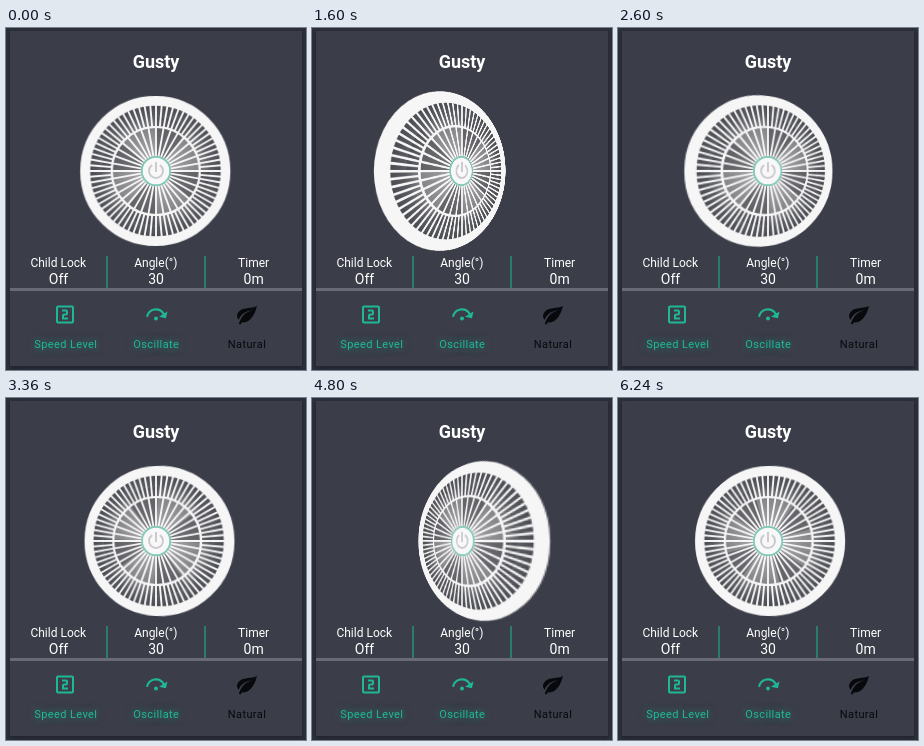
Recreate the animation shown at these times as an HTML page. Size 300 px wide and 342 px high, loop 6280 ms.

```html
<!DOCTYPE html>
<html lang="en">
<head>
<meta charset="utf-8">
<title>Fan control</title>
<style>
  html, body { margin: 0; width: 100%; height: 100%; overflow: hidden; background: #2d303b; }
  #stage { position: relative; width: 300px; height: 342px; overflow: hidden; }
  #card { position: absolute; left: 4px; top: 3px; width: 292px; height: 335px; background: #3b3d48; box-shadow: 0 2px 4px #20232d; }
  #panel, #fan { position: absolute; display: block; }
  #panel { left: 0; top: 0; }
  #view { position: absolute; left: 70px; top: 62.5px; width: 160px; height: 160px; perspective: 140px; }
  #fan { left: 0; top: 0; width: 160px; height: 160px; }
  text { font-family: Roboto, "Open Sans", sans-serif; text-anchor: middle; fill: #fff; }
  .title { font-size: 18px; font-weight: 700; }
  .label { font-size: 12px; }
  .value { font-size: 14px; }
  .mode { font-size: 11px; letter-spacing: .4px; }
  .on { fill: #1fb897; }
  .off { fill: #07090d; }
  text.on { text-shadow: 0 0 8px #1fb897b0; }
</style>
</head>
<body>
<div id="stage">
  <div id="card"></div>
  <svg id="panel" width="300" height="342" viewBox="0 0 300 342">
    <text class="title" x="150" y="40">Gusty</text>
    <text class="label" x="52.3" y="239">Child Lock</text>
    <text class="value" x="52.5" y="255.5">Off</text>
    <text class="label" x="149.8" y="239">Angle(°)</text>
    <text class="value" x="150" y="255.5">30</text>
    <text class="label" x="247.6" y="239">Timer</text>
    <text class="value" x="247.6" y="255.5">0m</text>
    <path class="on" d="M100.5 228h1v32h-1zM198.5 228h1v32h-1z"/>
    <rect x="4" y="260" width="292" height="3" fill="#696b74"/>
    <g class="on" transform="translate(47 274.5)">
      <rect x="4" y="4" width="16" height="16" rx="1" fill="none" stroke="#1fb897" stroke-width="2"/>
      <path d="M15 15h-4v-2h2a2 2 0 0 0 2-2V9a2 2 0 0 0-2-2H9v2h4v2h-2a2 2 0 0 0-2 2v4h6z"/>
    </g>
    <g class="on" transform="translate(138 274.5)">
      <circle cx="12" cy="16" r="2"/>
      <path d="M23.5 8.9L21.9 15.8L15 14.2L18.8 11.8A8 8 0 0 0 4.1 14.6L2.1 14.3A10 10 0 0 1 20.5 10.7Z"/>
    </g>
    <path class="off" transform="translate(229 274.5)" d="M17 8C8 10 5.9 16.2 3.8 21.3L5.7 22L6.7 19.7C7.1 19.9 7.6 20 8 20C19 20 22 3 22 3C21 5 14 5.25 9 6.25C4 7.25 2 11.5 2 13.5S3.75 17.25 3.75 17.25C7 8 17 8 17 8Z"/>
    <text class="mode on" x="59.8" y="320">Speed Level</text>
    <text class="mode on" x="150.3" y="320">Oscillate</text>
    <text class="mode off" x="241" y="320">Natural</text>
  </svg>
  <div id="view">
    <svg id="fan" viewBox="-80 -80 160 160">
      <defs>
        <radialGradient id="depth" gradientUnits="userSpaceOnUse" cx="0" cy="0" r="66">
          <stop offset=".25" stop-color="#a2a2a5"/>
          <stop offset=".65" stop-color="#858589"/>
          <stop offset=".82" stop-color="#5c5d62"/>
          <stop offset="1" stop-color="#4a4b51"/>
        </radialGradient>
      </defs>
      <circle r="66" fill="url(#depth)"/>
      <g id="blades" fill="#3d3e44" opacity=".5"></g>
      <path id="grille" fill="none" stroke="#f6f6f7" stroke-width="1.9"/>
      <circle r="44" fill="none" stroke="#f6f6f7" stroke-width="2.2"/>
      <circle r="70.2" fill="none" stroke="#f6f6f7" stroke-width="9.8"/>
      <circle r="14.2" fill="#f8f8f9" stroke="#7fc8b7" stroke-width="1.8"/>
      <path fill="none" stroke="#cbcbce" stroke-width="2" d="M-3.8 -5.9A7 7 0 1 0 3.8 -5.9M0 -9V1"/>
    </svg>
  </div>
</div>
<script>
  const LOOP = 6280, STEP = 40, SWING = 40;
  const fan = document.getElementById('fan');
  const blades = document.getElementById('blades');

  const polar = (radius, degrees) => {
    const a = degrees * Math.PI / 180;
    return `${(radius * Math.cos(a)).toFixed(2)} ${(radius * Math.sin(a)).toFixed(2)}`;
  };

  const spokes = (count, inner, outer) => Array.from({ length: count }, (_, i) => {
    const a = i * 360 / count;
    return `M${polar(inner, a)}L${polar(outer, a)}`;
  }).join('');

  document.getElementById('grille').setAttribute('d', spokes(36, 14, 44) + spokes(72, 44, 66));
  blades.innerHTML = [0, 90, 180, 270].map(a =>
    `<path d="M0 0L${polar(54, a)}A54 54 0 0 1 ${polar(54, a + 38)}Z"/>`).join('');

  // One degree per step, bouncing between -SWING and SWING.
  const swingAngle = n => SWING - Math.abs((n + SWING) % (4 * SWING) - 2 * SWING);

  function draw(ms) {
    const step = Math.floor(ms % LOOP / STEP);
    fan.style.transform = `rotateY(${swingAngle(step + 1)}deg)`;
    blades.setAttribute('transform', `rotate(${step * 36})`);
  }

  const start = performance.now();
  function tick() {
    draw(performance.now() - start);
    requestAnimationFrame(tick);
  }
  tick();
</script>
</body>
</html>
```
